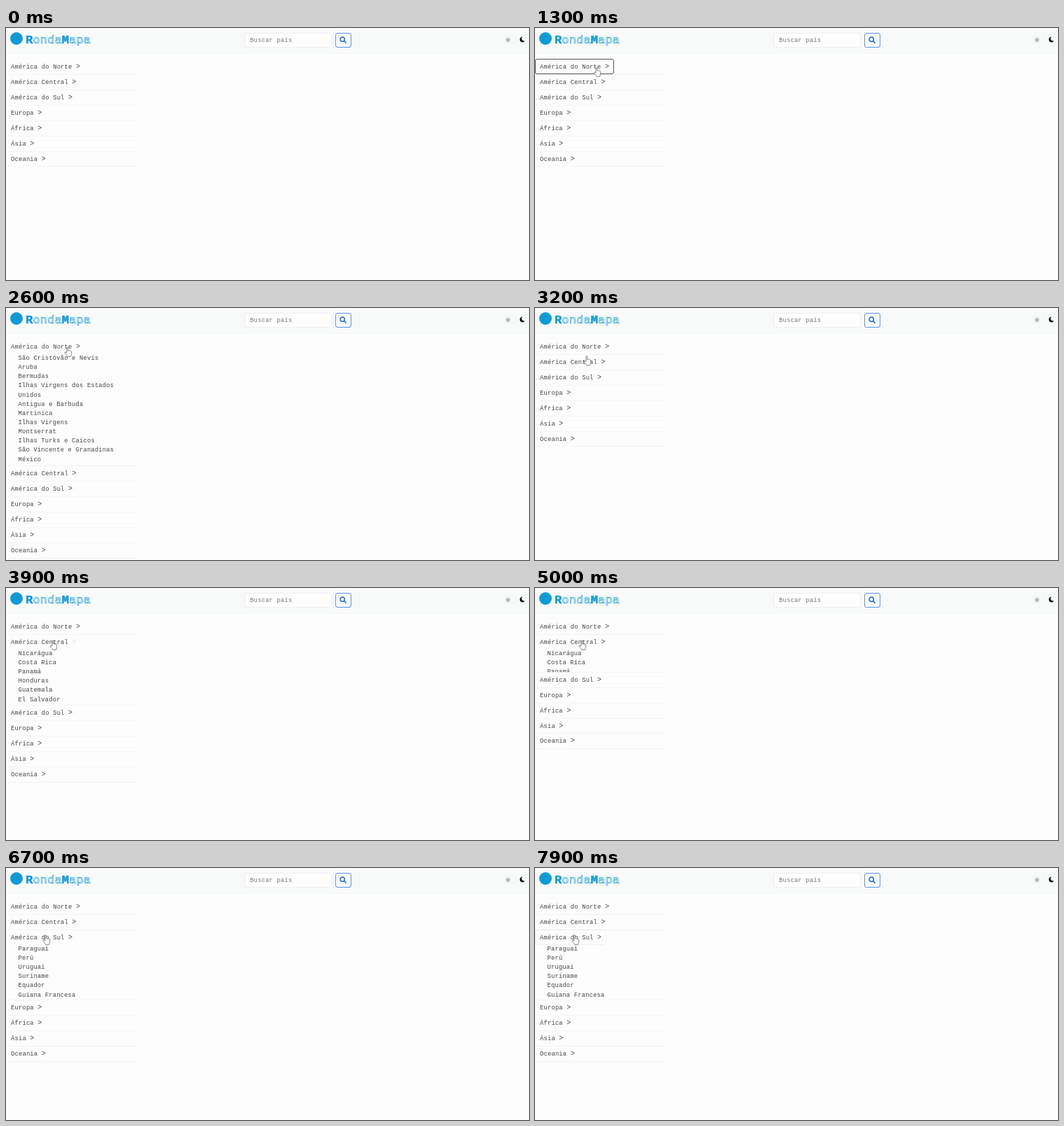
These frames come from a looping animation (748 px wide and 360 px high, 8 s). An HTML page:

```html
<!DOCTYPE html>
<html lang="pt">
<head>
<meta charset="utf-8">
<style>
  html, body { margin: 0; width: 100%; height: 100%; overflow: hidden; background: #fdfdfd; }
  body { position: relative; font: 8.8px/13.15px "Liberation Mono", monospace; letter-spacing: .19px; color: #444; }
  header { position: absolute; left: 0; top: 0; width: 748px; height: 36px; background: #f8f9f9; box-shadow: 0 1px 1px #f6f8f8; }
  header > *, #cursor { position: absolute; }
  .mark { left: 6px; top: 6px; width: 18px; height: 18px; border-radius: 50%; background: #129bd2; }
  .brand { left: 28px; top: 7px; font-size: 17.2px; line-height: 22px; letter-spacing: .03px; color: transparent; -webkit-text-stroke: .7px #2ba5d8; }
  .brand b { color: #129bd2; }
  .search { left: 341px; top: 7px; width: 116px; height: 19px; padding-left: 7px; border: 1px solid #f0f0f0; border-radius: 3px; background: #fefefe; line-height: 21px; color: #777; }
  .go { left: 470.5px; top: 7px; width: 21px; height: 19px; border: 1px solid #5a93e6; border-radius: 3px; }
  .toggle { left: 712px; top: 12px; width: 17px; height: 8px; border: 1px solid #f3f4f4; border-radius: 5px; }
  .toggle::after { content: ""; position: absolute; left: 1.5px; top: 1px; width: 6px; height: 6px; border-radius: 50%; background: #bbb; }
  header svg { left: 0; top: 0; }
  aside { position: absolute; left: 0; top: 44px; width: 186px; }
  section { box-shadow: 0 1px #f4f4f4; }
  .region { position: relative; height: 21.93px; line-height: 23px; padding-left: 7px; white-space: pre; }
  .chevron { font-size: 10px; font-style: italic; }
  .focus { position: absolute; left: 0; top: 0; height: 20px; border: 1px solid #555; border-radius: 3px; opacity: 0; }
  .list { overflow: hidden; height: 0; padding-left: 17.5px; white-space: pre; }
</style>
</head>
<body>
<header>
  <div class="mark"></div>
  <div class="brand"><b>R</b>onda<b>M</b>apa</div>
  <div class="search">Buscar país</div>
  <div class="go"></div>
  <div class="toggle"></div>
  <svg width="748" height="36">
    <g fill="none" stroke="#2f74d8" stroke-width="1.6"><circle cx="481.2" cy="16.2" r="3.1"/><path d="M483.4 18.4l3.2 3.2"/></g>
    <path d="M738.6 12.4a4 4 0 1 0 3.6 6a3.6 3.6 0 0 1-3.6-6z" fill="#111"/>
  </svg>
</header>
<aside></aside>
<svg id="cursor" width="16" height="18" style="left:0;top:0;overflow:visible" fill="#fff" stroke="#666" stroke-width=".8" stroke-linejoin="round">
  <path id="arrow" d="M0 0v10l2.4-2.2 1.6 3.6 1.5-.7-1.6-3.5h3.2z"/>
  <path id="hand" d="M-1 8V1q0-1 .9-1t.9 1v4q1-.8 1.8.2 1-.6 1.7.3 1.3-.4 1.4 1v3q0 1.5-1 3v.8h-5.2v-.8L-3.8 8.5q-.6-1.5.8-1.4z"/>
</svg>
<script>
const LOOP = 8000, STEP = 100;

// open: [time, fraction of the full height]
const regions = [
  { name: "América do Norte", height: 159.2,
    items: ["São Cristóvão e Nevis", "Aruba", "Bermudas", "Ilhas Virgens dos Estados", "Unidos", "Antigua e Barbuda",
      "Martinica", "Ilhas Virgens", "Montserrat", "Ilhas Turks e Caicos", "São Vincente e Granadinas", "México"],
    open: [[1300, 0], [1400, .4], [1500, .8], [1600, .95], [1700, 1], [2600, 1], [2700, 0]],
    focus: [1300, 1400, 1] },
  { name: "América Central", height: 79.2,
    items: ["Nicarágua", "Costa Rica", "Panamá", "Honduras", "Guatemala", "El Salvador"],
    open: [[3500, 0], [3600, .3], [3700, .75], [3800, .95], [3900, 1], [4800, 1], [4900, .85], [5000, .403], [5100, .1], [5300, 0]],
    focus: [4800, 4900, 1], dim: [3600, 4400, .15] },
  { name: "América do Sul", height: 78.2,
    items: ["Paraguai", "Perú", "Uruguai", "Suriname", "Equador", "Guiana Francesa"],
    open: [[6200, 0], [6300, .897], [6500, 1]],
    focus: [7900, 8000, .08], dim: [6300, 6700, .6] },
  ...["Europa", "África", "Ásia", "Oceania"].map(name => ({ name }))
];

// [time, x, y] of the pointer tip
const path = [[100, 390, 174], [200, 281, 154], [300, 191, 104], [400, 150, 82], [500, 118, 66], [600, 70, 38],
  [700, 46, 22], [800, 74, 45], [900, 88, 56], [2800, 88, 56], [3400, 67, 75], [5500, 67, 75], [5800, 73, 84], [6100, 57, 96]];

const $ = id => document.getElementById(id);

function add(parent, tag, className, text = "") {
  const node = parent.appendChild(document.createElement(tag));
  node.className = className;
  node.textContent = text;
  return node;
}

function at(keys, t, i = 1) {
  const next = keys.findIndex(k => k[0] > t);
  if (next === 0) return keys[0][i];
  if (next < 0) return keys.at(-1)[i];
  const a = keys[next - 1], b = keys[next];
  return a[i] + (b[i] - a[i]) * (t - a[0]) / (b[0] - a[0]);
}

const during = ([from, to, value], t, other) => t >= from && t < to ? value : other;

for (const r of regions) {
  const section = add(document.querySelector("aside"), "section", "");
  const button = add(section, "div", "region", r.name + " ");
  r.chevron = add(button, "span", "chevron", ">");
  if (!r.items) continue;
  r.outline = add(button, "div", "focus");
  r.outline.style.width = (r.name.length + 2) * 5.47 + 12.5 + "px";
  r.list = add(section, "div", "list", r.items.join("\n"));
}

function draw(now) {
  const t = Math.floor(now % LOOP / STEP) * STEP;
  for (const r of regions) {
    if (!r.items) continue;
    r.list.style.height = r.height * at(r.open, t) + "px";
    r.outline.style.opacity = during(r.focus, t, 0);
    if (r.dim) r.chevron.style.opacity = during(r.dim, t, 1);
  }
  $("cursor").style.transform = `translate(${at(path, t)}px, ${at(path, t, 2)}px)`;
  $("cursor").style.visibility = t < 100 ? "hidden" : "visible";
  $("arrow").style.display = t < 800 ? "" : "none";
  $("hand").style.display = t < 800 ? "none" : "";
}

const start = performance.now();
(function tick() {
  draw(performance.now() - start);
  requestAnimationFrame(tick);
})();
</script>
</body>
</html>
```
